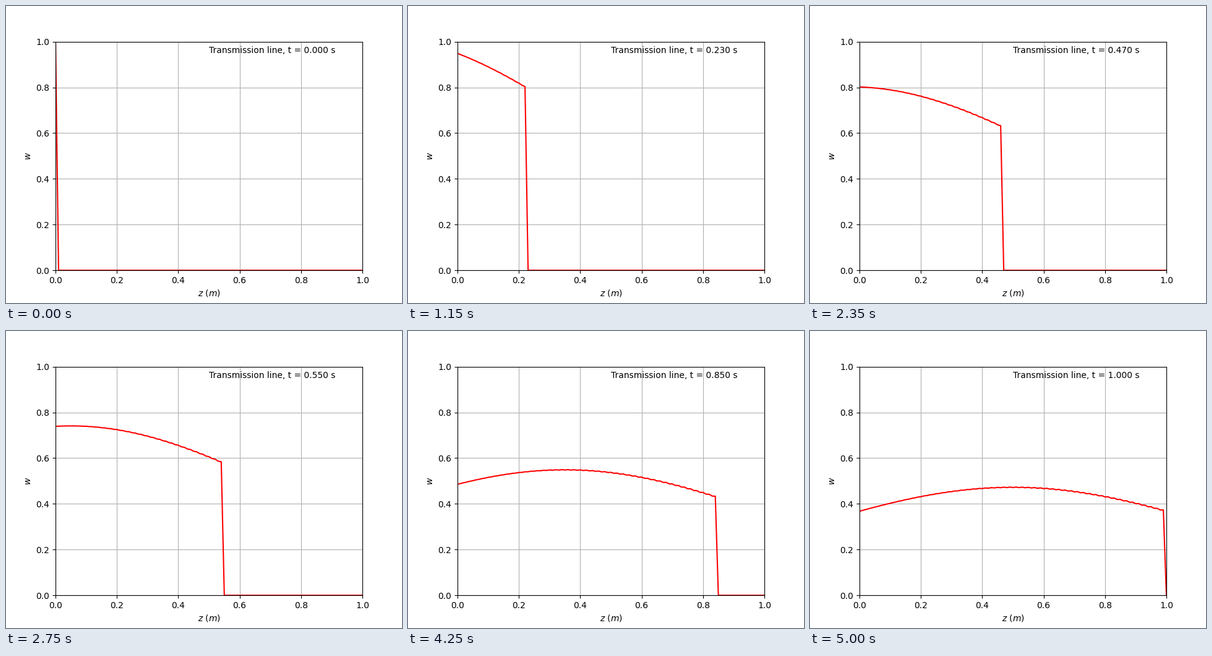
Write a matplotlib script that moves like this. It is 640 px wide and 480 px high and loops after 5.05 s.

```python
import numpy as np
import matplotlib.pyplot as plt
from matplotlib.animation import FuncAnimation

STEPS = 100
DT = 1 / STEPS


def solve_line():
    """March w_tt + 2 w_t + w = w_zz with a pulse exp(-t^2) fed in at z = 0."""
    w = np.zeros((STEPS + 1, STEPS + 1))
    w[:, 0] = np.exp(-(np.arange(STEPS + 1) * DT) ** 2)
    for n in range(1, STEPS):
        now, before = w[n], w[n - 1]
        w[n + 1, 1:-1] = (now[2:] + now[:-2] - (1 - DT) * before[1:-1]
                          - DT ** 2 * now[1:-1]) / (1 + DT)
    return w


z = np.linspace(0, 1, STEPS + 1)
waves = solve_line()

fig, ax = plt.subplots(figsize=(6.4, 4.8), dpi=100)
ax.set(xlim=(0, 1), ylim=(0, 1), xlabel=r"$z\ (m)$", ylabel="$w$")
ax.grid(True)
line, = ax.plot(z, waves[0], color="red", lw=1.5)
label = ax.text(0.5, 0.95, "")


def update(n):
    line.set_ydata(waves[n])
    label.set_text(f"Transmission line, t = {n * DT:.3f} s")
    return line, label


anim = FuncAnimation(fig, update, frames=STEPS + 1, interval=50,
                     init_func=lambda: update(0), repeat=True, repeat_delay=0)
plt.show()
```
